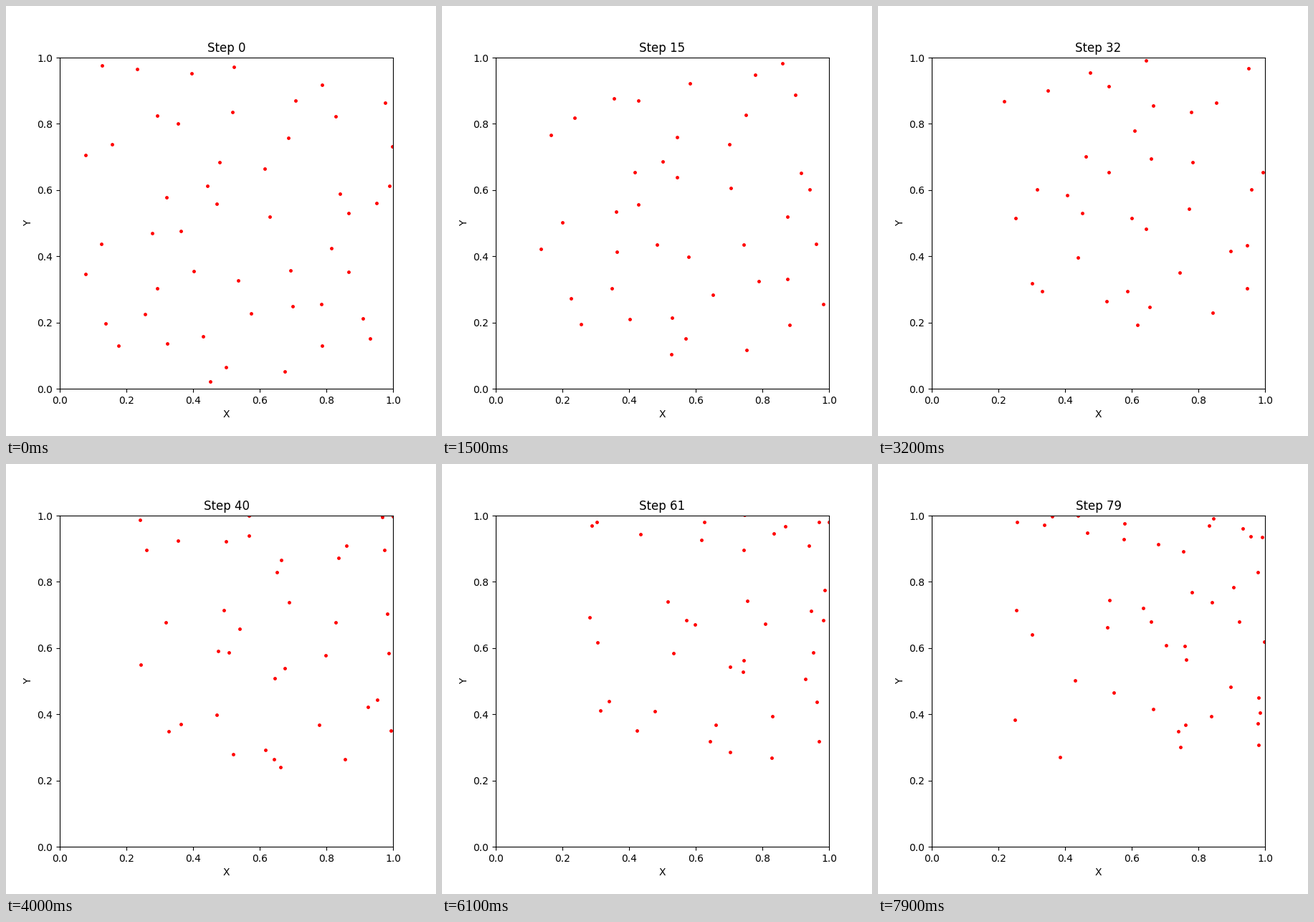
A matplotlib script for the animation above (8 s loop, 600x600 px).

```python
import numpy as np
import matplotlib.pyplot as plt
from matplotlib.animation import FuncAnimation

STEPS = 80
SIDE = 7
DRIFT = 0.005
WALL = 1.02


def scatter_start(rng):
    """One random point in each cell of a square grid."""
    cells = np.indices((SIDE, SIDE)).reshape(2, -1).T
    spots = (cells + rng.uniform(0, 1, cells.shape)) / SIDE
    return (0.07, 0.02) + spots * (0.93, 0.96)


def walk(steps, seed=5):
    """Drifting random walk whose jitter grows while the drift fades."""
    rng = np.random.default_rng(seed)
    path = [scatter_start(rng)]
    for n in range(1, steps):
        drift = DRIFT * np.exp(-max(0, n - 30) / 15)
        spread = 0.005 + 0.015 * np.clip((n - 9) / 40, 0, 1)
        pos = path[-1] + drift + rng.uniform(-spread, spread, path[-1].shape)
        path.append(np.where(pos > WALL, 2 * WALL - pos, pos))
    return path


path = walk(STEPS)

fig, ax = plt.subplots(figsize=(6, 6), dpi=100)
ax.set(xlim=(0, 1), ylim=(0, 1), xlabel="X", ylabel="Y")
dots, = ax.plot([], [], "ro", markersize=2.5)
title = ax.set_title("Step 0")


def update(n):
    dots.set_data(*path[n].T)
    title.set_text(f"Step {n}")
    return dots, title


anim = FuncAnimation(fig, update, frames=STEPS, interval=100,
                     repeat=True, repeat_delay=0, blit=False)
plt.show()
```
